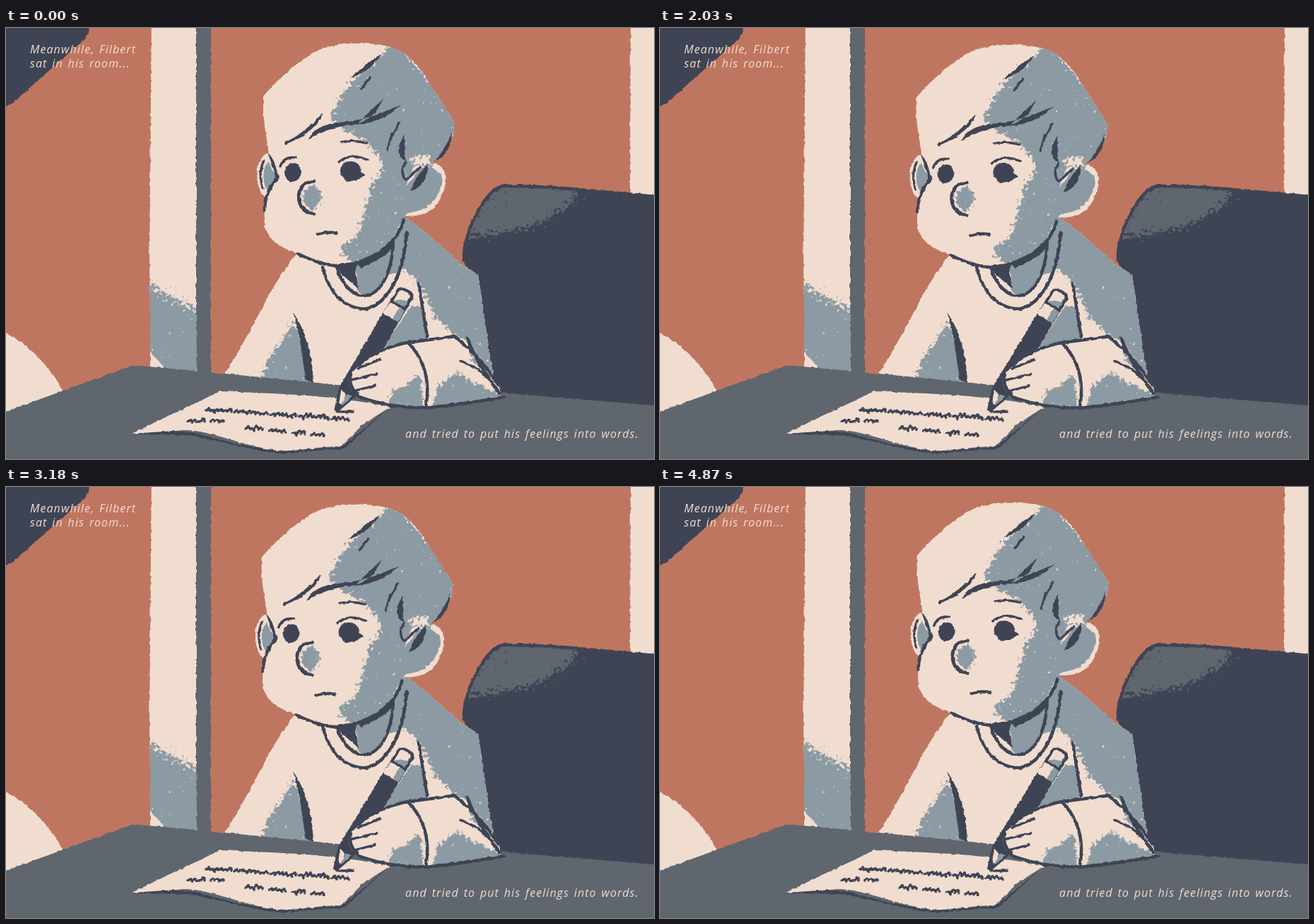
Animation of 917x611 px, one loop 5040 ms. Source, as an HTML page:

```html
<!DOCTYPE html>
<html lang="en">
<head>
<meta charset="utf-8">
<title>Writing at the desk</title>
<style>
  html, body { margin: 0; width: 100%; height: 100%; overflow: hidden; background: #bf7660; }
  svg { display: block; width: 917px; height: 611px; }
  .cream { fill: #f1ddd0; }
  .navy { fill: #3f4454; }
  .grey { fill: #5f666e; }
  .blue { fill: #8b9aa3; }
  .line { fill: none; stroke: #3f4454; stroke-width: 4.5; stroke-linecap: round; stroke-linejoin: round; }
  .fine { stroke-width: 3.4; }
  .rough { filter: url(#rough); }
  text { font: italic 500 16px "Open Sans", sans-serif; letter-spacing: 1.1px; word-spacing: 1.6px; fill: #f1ddd0; }
</style>
</head>
<body>
<svg viewBox="0 0 917 611">
  <defs>
    <!-- uneven edge of a brush -->
    <filter id="rough" filterUnits="userSpaceOnUse" x="-20" y="-20" width="960" height="660" color-interpolation-filters="sRGB">
      <feTurbulence type="fractalNoise" baseFrequency=".15" numOctaves="2" seed="4"/>
      <feDisplacementMap in="SourceGraphic" scale="3.5" xChannelSelector="R" yChannelSelector="G"/>
    </filter>
    <path id="headShape" d="M364 97C384 73 415 46 443 31C470 20 515 19 545 27C582 40 594 72 614 101L635 134C635 158 622 178 606 188L590 225L564 268C556 300 530 322 500 333C470 342 440 334 412 319C392 313 374 303 367 285C362 260 370 230 383 213C380 200 374 190 372 178C368 150 363 130 364 97Z"/>
    <path id="bodyShape" d="M412 318C395 342 380 362 365 392C350 420 326 466 308 492L700 530L690 495C682 450 674 385 668 350L645 335C620 314 592 286 565 268L500 320Z"/>
    <path id="handShape" d="M500 478C518 457 545 447 570 445L637 437C660 440 680 480 698 505L700 522L600 539C565 542 525 536 498 521C484 512 482 497 488 490Z"/>
    <path id="chairShape" d="M650 337C644 320 652 292 662 270C675 243 688 227 703 223C770 222 850 232 940 240V545H690L668 350Z"/>
    <clipPath id="inHead"><use href="#headShape"/></clipPath>
    <clipPath id="inBody"><use href="#bodyShape"/></clipPath>
    <clipPath id="inHand"><use href="#handShape"/></clipPath>
    <clipPath id="inChair"><use href="#chairShape"/></clipPath>
    <clipPath id="inPost"><path d="M204 0H270V490H204Z"/></clipPath>
  </defs>

  <!-- room -->
  <g class="rough">
    <path fill="#bf7660" d="M-20-20H940V640H-20Z"/>
    <path class="navy" d="M-9-9H118C119 8 112 17 102 24L22 95C14 104 8 110-9 116Z"/>
    <path class="cream" d="M206-20H270V492H206L203 340ZM884-20H940V240H883Z"/>
    <path class="grey" d="M269-20H290V492H269Z"/>
    <g clip-path="url(#inPost)">
      <path class="blue" data-dry="10" d="M180 350L228 378L300 418V510H180Z"/>
      <path class="cream" d="M200 454L226 484H200Z"/>
    </g>
    <path class="cream" d="M-9 428C35 447 64 484 82 517L-9 560Z"/>
    <use href="#chairShape" class="navy"/>
    <g clip-path="url(#inChair)"><path class="grey" data-dry="8" d="M645 298C662 262 685 232 708 215L806 222C812 240 800 250 785 258C755 280 720 290 645 298Z"/></g>
    <path class="line" d="M649 330C645 315 655 285 664 267C676 243 688 228 703 224C770 223 850 233 940 241"/>
  </g>

  <!-- body, desk and paper -->
  <g class="rough">
    <use href="#bodyShape" class="cream"/>
    <g clip-path="url(#inBody)">
      <path class="blue" data-dry="4" d="M560 255L650 325L690 345V500L664 466L630 432L606 408L594 378L576 352L552 333Z"/>
      <path class="blue" data-dry="4" d="M360 505L372 468L394 440L405 412L418 440L432 505Z"/>
      <path class="blue" d="M574 393L589 396L597 440L535 452Z"/>
    </g>
    <path class="cream" d="M447 338C456 376 480 400 510 398C545 388 566 340 567 290L500 320Z"/>
    <path class="blue" d="M548 285L567 278Q567 320 557 346L541 350ZM492 335L548 292C548 335 540 368 508 379C497 376 492 366 497 355Z"/>
    <path class="navy" d="M467 336L500 332L494 346L499 370L484 357L474 348ZM495 334C520 326 540 312 548 288L549 308C540 324 522 330 503 340ZM406 403C424 428 434 462 435 504L425 499C418 468 418 438 406 403Z"/>
    <path class="line" d="M448 339C457 376 480 399 510 398C543 390 563 345 567 290M468 339C475 364 494 384 512 379C536 372 549 335 548 292M584 362Q589 395 596 437"/>
    <path class="grey" d="M-20 551L180 478L290 488L440 503L470 506L700 517L940 537V640H-20Z"/>
    <path class="navy" d="M178 576L225 571L262 573L330 590L385 600L475 594L540 540L478 597C440 597 410 604 382 603C340 598 280 578 250 577Z"/>
    <path class="cream" d="M178 575L303 515C380 518 460 520 544 537L505 562L475 593C440 593 410 601 385 599C340 594 290 571 255 570Z"/>
    <path class="line fine" id="writing"/>
  </g>

  <!-- head -->
  <g id="head"><g class="rough">
    <path class="cream" d="M373 176C358 180 352 203 357 222C360 236 366 241 369 240L386 212Z"/>
    <path class="blue" d="M371 190C363 195 362 220 370 230L384 212Z"/>
    <path class="line fine" d="M365 188Q356 206 364 228"/>
    <path class="cream" d="M584 192C610 186 626 200 622 220C616 250 600 270 562 266Z"/>
    <path class="blue" d="M580 200C604 192 620 204 617 221C611 243 597 261 560 263Z"/>
    <use href="#headShape" class="cream"/>
    <g clip-path="url(#inHead)">
      <path class="blue" data-dry="4" d="M546 15L650 134L612 200L564 275L545 305L500 342L476 320L474 312L500 290L510 250L520 215L533 205L530 185L512 164L482 145L458 133L466 110L486 80L534 36Z"/>
    </g>
    <path class="blue" d="M568 222L592 200L610 210L596 256L558 264Z"/>
    <ellipse class="cream" data-dry="4" cx="588" cy="188" rx="16" ry="7"/>
    <path class="cream" d="M578 196L588 193L574 216L566 224Z"/>
    <!-- hair -->
    <path class="navy" d="M486 71Q512 65 532 37Q524 40 511 51ZM427 159Q438 137 470 134Q520 130 558 108Q544 128 505 136Q460 137 427 159ZM402 159Q424 146 449 120Q438 148 402 159ZM498 135Q520 130 534 100Q515 118 498 135ZM566 190Q545 176 565 151Q562 170 566 190ZM606 190Q632 176 631 148Q624 168 606 190ZM573 231Q576 214 597 193Q598 222 573 231ZM370 176L378 186L387 212L382 220L380 204Z"/>
    <path class="line fine" d="M396 163L420 152M503 86L515 71M540 172L546 151M547 152L557 134M566 190Q556 203 566 216L586 197"/>
    <!-- face -->
    <ellipse class="blue" data-dry="3" cx="433" cy="240" rx="13" ry="17"/>
    <path class="line" d="M437 217Q414 219 414 240Q416 262 436 263M441 292Q455 288 467 291M383 213Q366 234 366 258M413 320Q440 334 465 337Q500 336 528 318Q556 298 563 272"/>
    <path class="line fine" d="M474 162Q490 158 510 163"/>
    <path class="navy" d="M394 204C397 188 417 187 418 203C418 219 399 223 395 210ZM473 202C474 185 502 184 502 203L509 209L502 212C494 222 473 219 473 202Z"/>
    <path class="line fine" id="creases" d="M388 196Q394 181 410 184M471 190Q487 176 512 187"/>
    <g id="lids">
      <path class="cream" d="M391 172H421V204H391ZM471 172H510V200H471Z"/>
      <path class="line" d="M388 202Q400 206 418 203M471 200Q488 198 507 202"/>
    </g>
  </g></g>

  <!-- pencil and hand -->
  <g class="rough">
    <g id="pencil">
      <path class="navy" d="M-3 0L-13-30V-190Q-12-200-4-200H5Q13-200 13-190V-30L3 0Z"/>
      <path class="cream" d="M-2-12L-9-30L0-27L3-12ZM-13-153H10V-172H-12ZM-9-176H9V-190Q8-196 4-196H-4Q-9-196-9-190Z"/>
      <path class="blue" d="M2-12L1-28L9-30L4-12ZM3-153H12V-172H3ZM-9-176L-2-182L9-186V-176Z"/>
    </g>
    <g id="hand">
      <use href="#handShape" class="cream"/>
      <g clip-path="url(#inHand)">
        <path class="blue" data-dry="3" d="M535 545L546 516L566 506L588 490L590 545ZM600 545L612 508L640 486L655 500L700 520V545ZM650 432L695 490L684 496L660 472Z"/>
      </g>
      <path class="line" d="M498 522Q545 540 600 538Q650 533 705 523M500 478Q520 456 568 446L636 437M488 491Q484 507 497 519M569 446Q604 482 594 537M636 438Q670 465 697 506M652 439Q668 478 698 518"/>
      <path class="line fine" d="M499 482L529 470M488 499L525 490M495 514L522 507M643 472Q680 485 697 516"/>
    </g>
  </g>

  <text x="34" y="36">Meanwhile, Filbert</text>
  <text x="34" y="56">sat in his room...</text>
  <text x="565" y="581">and tried to put his feelings into words.</text>
</svg>

<script>
const LOOP = 5040, FRAME = 168;
const el = id => document.getElementById(id);
const clamp = (x, low, high) => Math.min(high, Math.max(low, x));

// Dry brush: a blurred shape cut off by noise, with a grain as wide as the blur.
const dryFilter = blur => `
  <filter id="dry${blur}" x="-.4" y="-.4" width="1.8" height="1.8" color-interpolation-filters="sRGB">
    <feGaussianBlur stdDeviation="${blur}" result="blur"/>
    <feMorphology in="SourceGraphic" operator="dilate" radius="${blur * 1.8}" result="paint"/>
    <feTurbulence type="fractalNoise" baseFrequency=".2" numOctaves="3" seed="7"/>
    <feColorMatrix values="0 0 0 0 0  0 0 0 0 0  0 0 0 0 0  1 0 0 0 0" result="noise"/>
    <feComposite in="blur" in2="noise" operator="arithmetic" k2=".5" k3=".8"/>
    <feComponentTransfer result="grain"><feFuncA type="linear" slope="10" intercept="-6"/></feComponentTransfer>
    <feComposite in="paint" in2="grain" operator="in"/>
  </filter>`;
const dryShapes = [...document.querySelectorAll('[data-dry]')];
const blurs = new Set(dryShapes.map(shape => shape.dataset.dry));
document.querySelector('defs').insertAdjacentHTML('beforeend', [...blurs].map(dryFilter).join(''));
for (const shape of dryShapes) shape.style.filter = `url(#dry${shape.dataset.dry})`;

// A line of scribbled words: slanted ticks on a smeared base, then a gap.
let seed = 11;
const random = () => (seed = seed * 16807 % 2147483647) / 2147483647;
function scribble(x, y, end, slope, wordLength, gap) {
  let d = '';
  while (x < end) {
    const wordEnd = Math.min(end, x + wordLength * (.6 + .8 * random()));
    d += `M${x} ${y + 2}`;
    for (; x < wordEnd; x += 6, y += 6 * slope) d += `l4 ${-5 * random()}l2 ${4 * random()}L${x + 6} ${y + 2}`;
    x += gap;
    y += gap * slope;
  }
  return d;
}
el('writing').setAttribute('d', scribble(283, 540, 484, .07, 50, 4) + scribble(257, 556, 314, 0, 14, 8) +
  scribble(339, 566, 450, .1, 18, 9) + 'M468 544H492');

let shown = '';
function draw() {
  const t = performance.now() % LOOP;
  const frame = Math.floor((t + 12) / FRAME);
  // the pencil swings every ten frames, the head sinks and rises once a loop
  const swing = Math.max(0, 4.5 - Math.abs(frame % 10 - 5.5));
  const nod = clamp(Math.floor((14 - Math.abs(frame - 17)) / 2), 0, 6);
  // the blink runs on half frames
  const half = Math.floor((t - 2540) / 80);
  const open = half < 1 || half > 6;
  const drop = open ? 0 : 6 - 4 * Math.abs(half - 2.5);

  const pose = [swing, nod, open, drop].join();
  if (pose !== shown) {
    shown = pose;
    el('pencil').setAttribute('transform', `translate(${467 - 1.6 * swing} 543) rotate(${30.4 + .85 * swing})`);
    el('hand').setAttribute('transform', `rotate(${-.14 * swing} 700 520)`);
    el('head').setAttribute('transform', `translate(${-.4 * nod} ${.5 * nod})`);
    el('creases').style.display = open ? '' : 'none';
    el('lids').style.display = open ? 'none' : '';
    el('lids').setAttribute('transform', `translate(0 ${drop})`);
  }
  requestAnimationFrame(draw);
}
draw();
</script>
</body>
</html>
```
